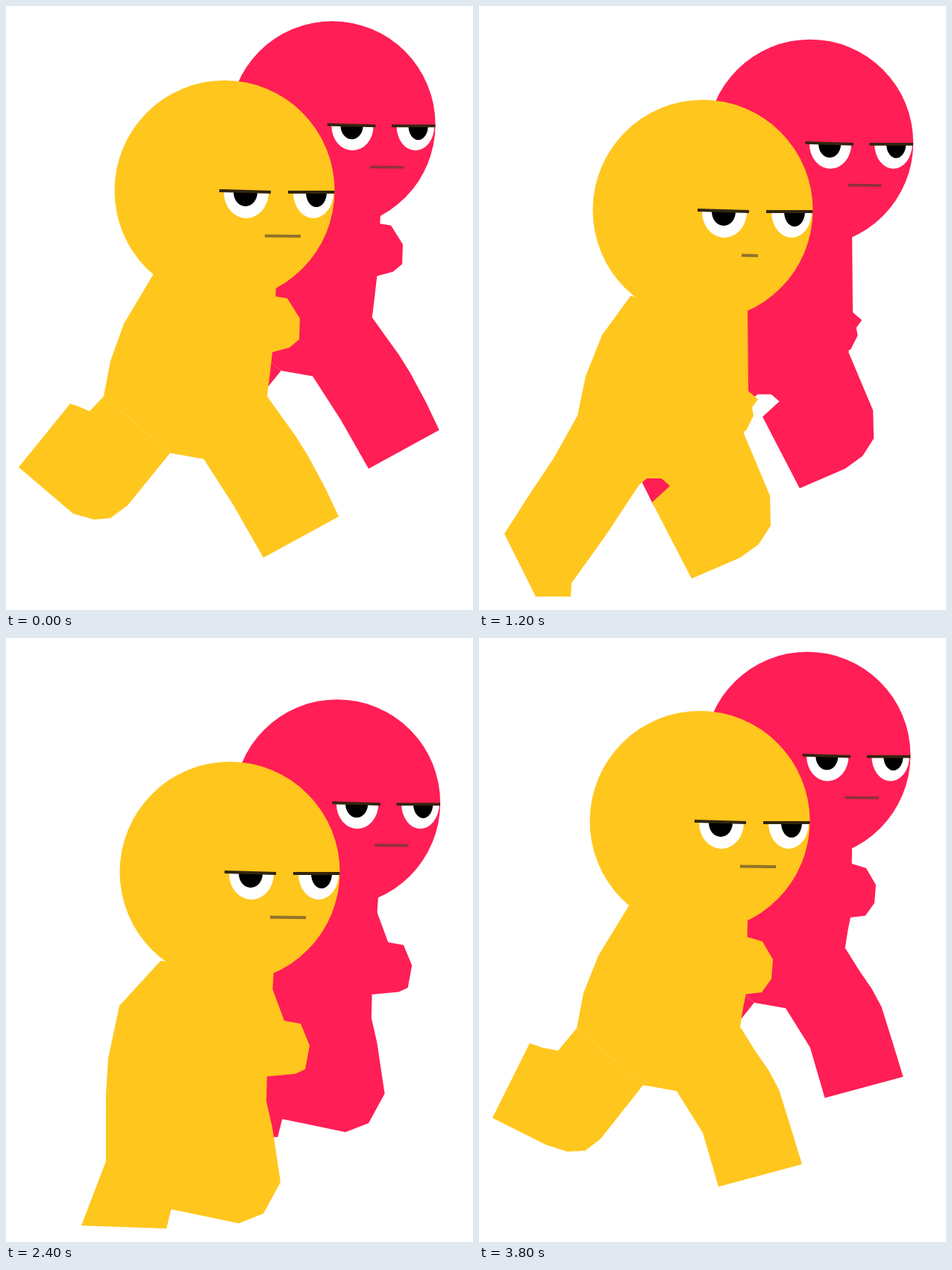
An HTML page with a canvas that plays this animation: 626 by 808 pixels, repeating every 3.87 s.

```html
<!DOCTYPE html>
<html lang="en">
<head>
<meta charset="utf-8">
<title>Two runners</title>
<style>
html, body { margin: 0; width: 100%; height: 100%; overflow: hidden; background: #fff; }
canvas { display: block; }
</style>
</head>
<body>
<canvas id="stage" width="626" height="808"></canvas>
<script>
const ctx = document.getElementById('stage').getContext('2d');

const LOOP = 3870, TICK = 1000 / 15, TICKS = 58;
const STRIDE = 4.8; // ticks per step

// Outlines are flat x,y lists. Legs run hip, back of knee, heel, toe, shin, knee, hip.
const reach = {
  head: [293, 247],
  torso: [198,358, 158,425, 140,475, 131,522, 220,598, 262,604, 350,522, 354,490, 358,455, 362,375],
  hand: [340,388, 358,388, 377,391, 394,418, 393,446, 380,457, 350,465],
  elbow: [200,400, 170,430, 160,470, 150,505, 180,520, 200,500],
  rear: [131,522, 112,542, 98,536, 86,532, 17,617, 90,679, 118,687, 140,685, 163,668, 220,598],
  front: [220,598, 265,606, 305,668, 345,738, 446,683, 428,645, 405,602, 388,575, 370,550, 350,522]
};

const stretch = {
  ...reach,
  rear: [131,522, 116,540, 108,530, 98,521, 14,600, 88,676, 118,687, 140,685, 163,668, 220,598],
  front: [220,598, 265,606, 312,668, 362,736, 455,670, 432,635, 405,600, 388,572, 370,548, 350,522]
};

const drop = {
  head: [291, 251],
  torso: [194,362, 145,396, 138,490, 140,577, 195,670, 250,680, 311,608, 340,560, 352,502, 358,382],
  hand: [355,385, 380,423, 405,440, 415,462, 414,485, 392,501, 350,503],
  elbow: [170,382, 132,400, 104,477, 75,525, 112,554, 134,542],
  rear: [160,540, 200,560, 185,555, 165,553, 106,608, 172,677, 192,690, 226,692, 260,670, 290,620],
  front: [200,640, 215,675, 228,695, 262,745, 357,680, 334,645, 311,608, 322,592, 335,572, 346,540]
};

const land = {
  head: [300, 313],
  torso: [207,432, 152,492, 137,562, 134,610, 170,720, 260,720, 357,655, 349,620, 350,580, 359,444],
  hand: [350,450, 373,512, 395,516, 407,545, 401,577, 388,583, 345,587],
  elbow: [190,455, 152,492, 150,520, 145,560, 180,570, 200,520],
  rear: [134,610, 134,655, 134,700, 101,786, 215,790, 222,762, 240,700, 260,680, 270,660, 280,620],
  front: [200,600, 230,670, 200,680, 175,670, 175,755, 240,768, 312,783, 345,770, 368,728, 357,655]
};

const push = {
  head: [300, 273],
  torso: [203,388, 165,440, 143,495, 132,548, 217,632, 250,632, 355,572, 358,550, 361,515, 360,404],
  hand: [340,450, 361,515, 374,526, 366,537, 368,548, 358,568, 345,572],
  elbow: [200,420, 175,460, 160,500, 150,530, 180,540, 200,500],
  rear: [132,548, 100,605, 66,656, 34,706, 76,790, 123,790, 124,772, 170,708, 215,640, 225,632],
  front: [217,632, 240,628, 256,642, 232,664, 285,766, 350,738, 375,720, 391,695, 390,655, 355,572]
};

const leap = {
  ...reach,
  head: [296, 245],
  torso: [201,358, 160,425, 140,475, 131,522, 220,598, 262,604, 350,520, 354,495, 358,475, 360,378],
  hand: [340,385, 360,400, 380,406, 394,430, 392,456, 379,474, 345,478],
  rear: [131,522, 106,552, 85,548, 68,542, 18,642, 90,678, 118,687, 142,686, 163,670, 220,598],
  front: [220,598, 265,606, 300,662, 321,734, 433,704, 418,655, 402,604, 388,578, 370,552, 350,520]
};

const keys = [
  [0, reach], [0.2, stretch], [0.6, stretch], [0.8, drop], [1.05, drop], [2.4, land],
  [3.15, push], [3.65, push], [4.15, leap], [4.65, leap], [STRIDE, reach]
];

const mix = (a, b, k) => a.map((v, i) => v + (b[i] - v) * k);

function poseAt(u) {
  let i = 0;
  while (i < keys.length - 2 && u >= keys[i + 1][0]) i++;
  const [t0, a] = keys[i], [t1, b] = keys[i + 1];
  const k = Math.min(1, (u - t0) / (t1 - t0));
  const swap = a === drop && b === land; // the legs pass each other here
  const pose = {};
  for (const part in a) {
    let next = part;
    if (swap && part === 'rear') next = 'front';
    if (swap && part === 'front') next = 'rear';
    pose[part] = mix(a[part], b[next], k);
  }
  return pose;
}

function fillShape(p) {
  ctx.beginPath();
  for (let i = 0; i < p.length; i += 2) ctx.lineTo(p[i], p[i + 1]);
  ctx.closePath();
  ctx.fill();
}

function halfDisc(x, rx, ry, color) {
  ctx.fillStyle = color;
  ctx.beginPath();
  ctx.ellipse(x, 2, rx, ry, 0, 0, Math.PI);
  ctx.fill();
}

function line(x0, y0, x1, y1, width, color) {
  ctx.strokeStyle = color;
  ctx.lineWidth = width;
  ctx.beginPath();
  ctx.moveTo(x0, y0);
  ctx.lineTo(x1, y1);
  ctx.stroke();
}

function drawFace(mouthHalf) {
  halfDisc(29, 30, 35, '#fff');
  halfDisc(119, 27, 35, '#fff');
  halfDisc(28, 16, 19, '#000');
  halfDisc(123, 14, 20, '#000');
  line(-7, 0, 62, 2, 4, '#33260f');
  line(85, 2, 150, 2, 4, '#33260f');
  const mid = mouthHalf < 20 ? 63 : 78;
  line(mid - mouthHalf, 60.5, mid + mouthHalf, 61, 4, 'rgba(70,60,50,.6)');
}

function drawRunner(pose, color, mouthHalf) {
  ctx.fillStyle = color;
  for (const part of ['rear', 'front', 'torso', 'elbow', 'hand']) fillShape(pose[part]);
  ctx.save();
  ctx.translate(...pose.head);
  ctx.beginPath();
  ctx.arc(0, 0, 147.5, 0, Math.PI * 2);
  ctx.fill();
  ctx.clip();
  drawFace(mouthHalf);
  ctx.restore();
}

function render(ms) {
  const tick = Math.min(TICKS - 1, Math.floor((ms % LOOP + 3.4) / TICK));
  const u = tick % STRIDE;
  const pose = poseAt(u);
  ctx.fillStyle = '#fff';
  ctx.fillRect(0, 0, 626, 808);
  ctx.save();
  ctx.translate(162.6, -73);
  ctx.scale(0.9375, 0.9375);
  drawRunner(pose, '#ff1e55', 24);
  ctx.restore();
  drawRunner(pose, '#ffc61e', u > 3.1 && u < 3.7 ? 11 : 24);
}

const start = performance.now();
function loop() {
  render(performance.now() - start);
  requestAnimationFrame(loop);
}
loop();
</script>
</body>
</html>
```
